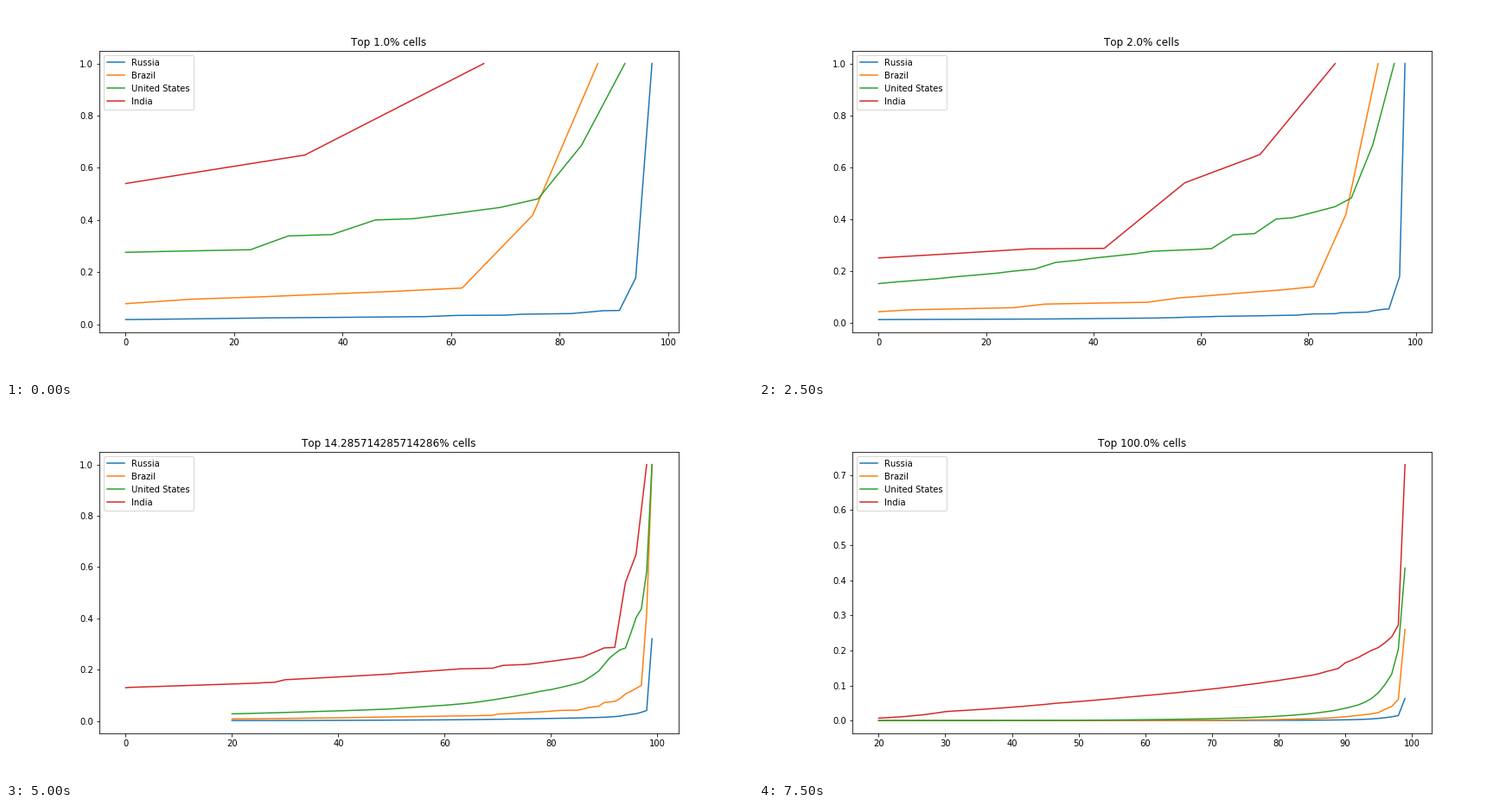
Write a matplotlib script that moves like this. It is 864x432 px and loops after 8 s.

```python
import numpy as np
import matplotlib.pyplot as plt
from matplotlib.animation import FuncAnimation

plt.rcParams.update({"font.family": "DejaVu Sans", "font.size": 10,
                     "text.kerning_factor": 6})

DIVISORS = [*range(100, 0, -10), 7, 5, 4, 3, 2, 1]
SHOWN_BINS = 80


def ranked_cells(*key_points):
    """Ascending values that decay exponentially between (rank, value) points."""
    ranks, values = zip(*key_points)
    rank = np.arange(ranks[-1], 0, -1)
    return np.exp(np.interp(rank, ranks, np.log(values)))


COUNTRIES = {
    "Russia": ranked_cells(
        (1, 1), (2, .178), (3, .053), (4, .052), (6, .041), (9, .0385),
        (10, .035), (13, .034), (15, .0293), (25, .0245), (33, .0183),
        (48, .0143), (87, .0107), (199, .0045), (299, .0025), (580, .0008),
        (3490, .00001)),
    "Brazil": ranked_cells(
        (1, 1), (2, .418), (3, .139), (7, .096), (8, .079), (11, .072),
        (12, .058), (15, .05), (16, .0425), (20, .0415), (34, .027),
        (35, .022), (55, .0165), (92, .008), (160, .003), (239, .001),
        (805, .00001)),
    "United States": ranked_cells(
        (1, 1), (2, .686), (3, .481), (4, .448), (6, .405), (7, .4),
        (8, .344), (9, .339), (10, .286), (13, .276), (18, .233), (19, .207),
        (27, .151), (41, .117), (68, .07), (97, .047), (155, .028),
        (226, .0165), (318, .009), (545, .0025), (1368, .00001)),
    "India": ranked_cells(
        (1, 1), (2, .649), (3, .54), (4, .287), (5, .285), (7, .25),
        (12, .222), (15, .217), (16, .206), (19, .2035), (25, .186),
        (36, .161), (37, .151), (52, .13), (98, .096), (152, .068),
        (192, .05), (254, .026), (291, .007), (366, .0005)),
}


def percentile_means(cells, divisor):
    """Mean value per whole percentile of the top 1/divisor of the cells."""
    count = len(cells) // divisor
    percentiles = 100 * np.arange(count) // count
    bins, owner = np.unique(percentiles, return_inverse=True)
    means = np.bincount(owner, cells[-count:]) / np.bincount(owner)
    return bins[-SHOWN_BINS:], means[-SHOWN_BINS:]


fig = plt.figure(figsize=(12, 6), dpi=72, facecolor="white")
ax = fig.add_axes([0.125, 0.125, 0.775, 0.755])


def draw(index):
    divisor = DIVISORS[index]
    ax.clear()
    for name, cells in COUNTRIES.items():
        ax.plot(*percentile_means(cells, divisor), label=name)
    ax.set_title(f"Top {100 / divisor}% cells")
    ax.legend(loc="upper left")


anim = FuncAnimation(fig, draw, frames=len(DIVISORS), interval=500,
                     init_func=lambda: draw(0), repeat=True, repeat_delay=0)
plt.show()
```
